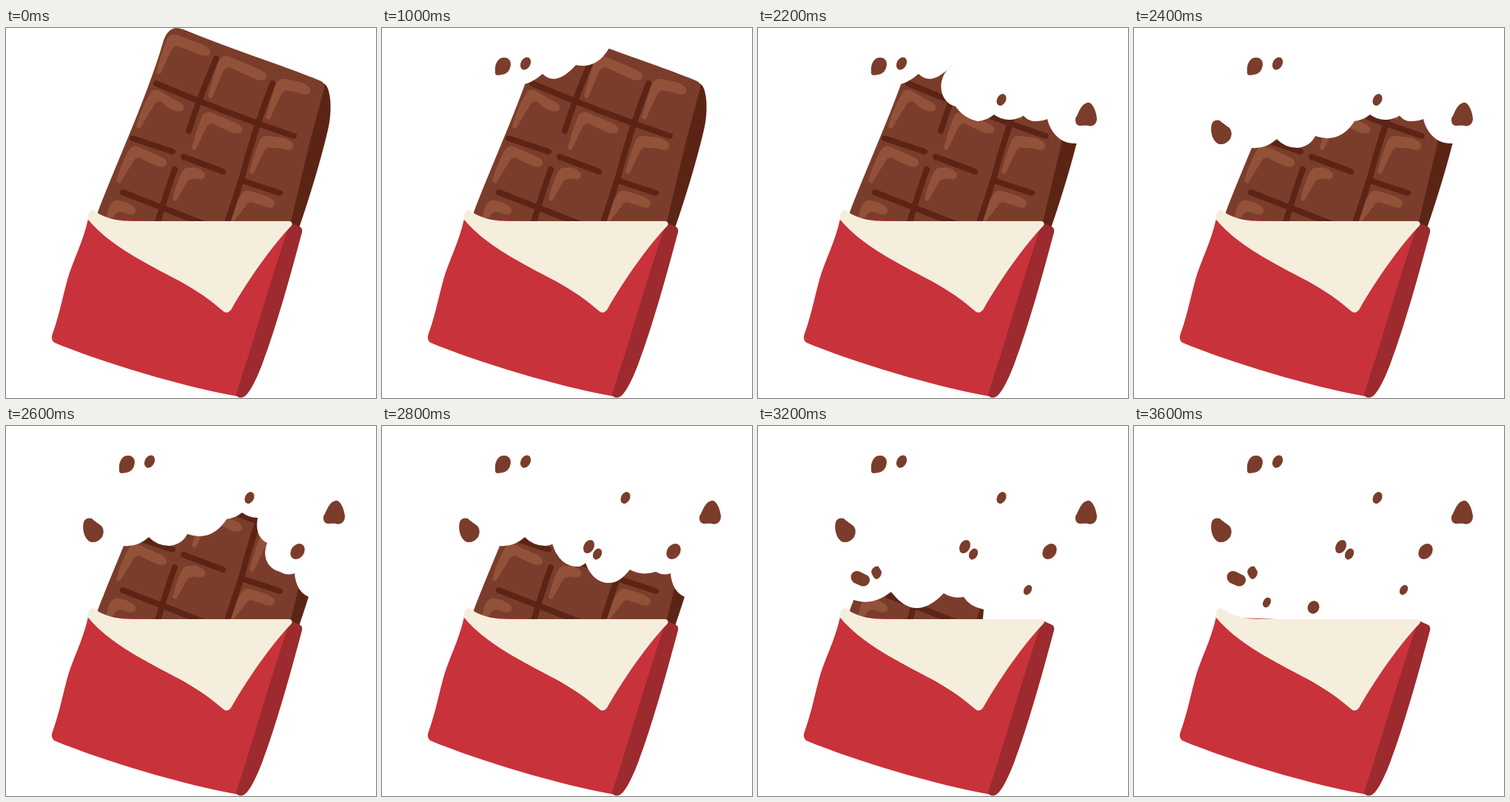
Write an HTML page that moves like this. It is 500 by 500 pixels and loops after 3.8 s.

```html
<!DOCTYPE html>
<html lang="en">
<head>
<meta charset="utf-8">
<title>Chocolate bar</title>
<style>
  html, body { margin: 0; width: 100%; height: 100%; overflow: hidden; background: #fff; }
  svg { display: block; width: 100%; height: 100%; }
</style>
</head>
<body>
<svg viewBox="0 0 500 500">
  <path fill="#5c2415" d="M425 74Q432 74 435 82C440 95 440 120 434 142Q420 200 396 270H380L405 170Z"/>
  <path fill="#7b3d2b" d="M122 254C150 180 190 95 212 20Q217 2 229 0Q236 0 245 4C300 27 370 49 424 71Q432 74 430 82L411 152L384 266H122Z"/>
  <g id="shine" fill="#925139"></g>
  <g fill="none" stroke="#5c2415" stroke-width="8" stroke-linecap="round">
    <path d="M203 75Q295 114 389 146M284 41Q261 95 247 139M360 75Q335 140 318 205L298 266"/>
    <path d="M171 149L225 167M240 174L293 194M318 206L370 223M228 191Q219 215 204 266M158 222L268 265"/>
  </g>
  <g id="bites" fill="#fff"></g>
  <path fill="#c8323b" d="M111 258C104 290 90 315 83 340C75 370 72 388 62 416Q61 421 65 425C130 452 240 485 314 498L350 400L386 268Z"/>
  <path fill="#9c2a2e" d="M387 264L398 269Q401 271 400 276C385 332 366 402 346 455Q330 496 320 499Q313 501 311 495C330 440 362 325 382 270Z"/>
  <path fill="#f5eedc" d="M111 259Q110 247 117 246C122 248 135 261 170 261H383Q388 262 386 267C365 288 330 335 304 381Q299 387 294 383C270 362 245 347 225 337C180 313 140 293 111 259Z"/>
  <g id="crumbs" fill="#7b3d2b"></g>
</svg>
<script>
const LOOP = 3800;
const $ = id => document.getElementById(id);

function add(parent, tag, attrs) {
  const el = document.createElementNS('http://www.w3.org/2000/svg', tag);
  for (const k in attrs) el.setAttribute(k, attrs[k]);
  return parent.appendChild(el);
}

// Bent highlight: outer corner c, lower tip b, right tip r
function shine(cx, cy, bx, by, rx, ry) {
  add($('shine'), 'path', { d: `M${bx - 3} ${by - 2}Q${bx + 2} ${by - 22} ${cx - 3} ${cy + 7}
    Q${cx + 1} ${cy - 2} ${cx + 10} ${cy}L${rx - 14} ${ry - 15}Q${rx + 2} ${ry - 9} ${rx} ${ry - 2}
    Q${rx - 3} ${ry + 5} ${rx - 17} ${ry - 1}L${cx + 14} ${cy + 16}Q${cx + 7} ${cy + 13} ${cx + 3} ${cy + 22}
    L${bx + 3} ${by - 1}Q${bx} ${by + 3} ${bx - 3} ${by - 2}Z` });
}
[
  [220, 9, 206, 62, 276, 36], [290, 38, 276, 94, 352, 69], [368, 69, 354, 123, 411, 88],
  [196, 84, 179, 135, 240, 111], [267, 114, 254, 164, 319, 141], [345, 146, 332, 196, 388, 163],
  [168, 160, 152, 209, 217, 186], [240, 189, 228, 233, 269, 203], [320, 220, 305, 262, 363, 241],
  [143, 233, 138, 260, 175, 250]
].forEach(s => shine(...s));

// Each step: time, bitten area, crumbs (a path, or x, y, rx, ry, tilt)
const steps = [
  [1000, 'M150 77H186Q201 76 217 62Q235 80 262 50Q290 56 307 27V-20H150Z', [
    'M153 59C152 50 156 40 164 40C172 39 176 46 173 54C170 64 160 63 156 64Q152 63 153 59Z',
    [194, 48, 6.5, 9, 28]]],
  [2000, 'M348 42C337 50 335 76 357 82C346 100 356 126 374 126Q384 126 391 123C395 140 408 157 430 156H460V30H348Z', [
    'M429 122C434 114 436 103 445 101C452 99 457 113 458 122C458 130 452 134 446 132C438 131 428 136 429 122Z']],
  [2200, 'M262 50C240 68 244 100 267 106Q278 122 297 126Q309 125 319 117Q337 130 358 119L372 110V20H262Z', [
    [329, 97, 6, 8.3, 28]]],
  [2400, 'M100 161H153Q176 166 193 150Q204 162 221 162Q238 160 245 146Q278 157 298 126V20H100Z', [
    'M105 130C107 124 115 123 118 127L129 135Q134 141 130 150Q124 158 116 157C108 156 102 142 105 130Z']],
  [2600, 'M340 110V125C337 143 343 153 353 158C345 178 355 193 370 197Q380 203 390 199C391 215 398 226 409 231H450V110Z', [
    [394, 169.5, 8.8, 11.3, 35]]],
  [2800, 'M230 100V158C235 178 248 190 264 190Q270 190 275 185C282 205 295 212 306 212C318 212 325 206 335 194Q350 203 370 197V100Z', [
    [279.5, 163, 6.8, 9.6, 28], [291, 173, 5.6, 7.8, 28]]],
  [3000, 'M100 234H127Q154 245 180 224Q212 267 251 226Q264 234 278 231Q298 228 302 210V140H100Z', [
    'M126 201Q130 194 138 197L148 202Q153 206 150 212Q146 218 139 216L130 212Q124 208 126 201Z',
    'M154 194Q158 188 163 190L167 197Q167 204 161 207Q157 207 155 202Q152 198 154 194Z']],
  [3200, 'M278 190V231Q286 244 305 248L303 272H420V190Z', [
    [364.5, 221.5, 5, 7.2, 32]]],
  [3400, 'M189 220Q190 254 210 264H310V220Z', [
    [242.5, 245, 7.8, 8.8, 25]]],
  [3600, 'M100 215H215V266H100Z', [
    [179.5, 238.5, 5, 7.2, 28]]]
].map(([time, bite, crumbs]) => ({
  time,
  parts: [
    add($('bites'), 'path', { d: bite }),
    ...crumbs.map(c => {
      if (typeof c === 'string') return add($('crumbs'), 'path', { d: c });
      const [cx, cy, rx, ry, tilt] = c;
      return add($('crumbs'), 'ellipse', { cx, cy, rx, ry, transform: `rotate(${tilt} ${cx} ${cy})` });
    })
  ]
}));

let start;
function draw(now) {
  start ??= now;
  const t = (now - start) % LOOP;
  for (const { time, parts } of steps)
    for (const el of parts) el.style.display = t >= time ? '' : 'none';
  requestAnimationFrame(draw);
}
requestAnimationFrame(draw);
</script>
</body>
</html>
```
